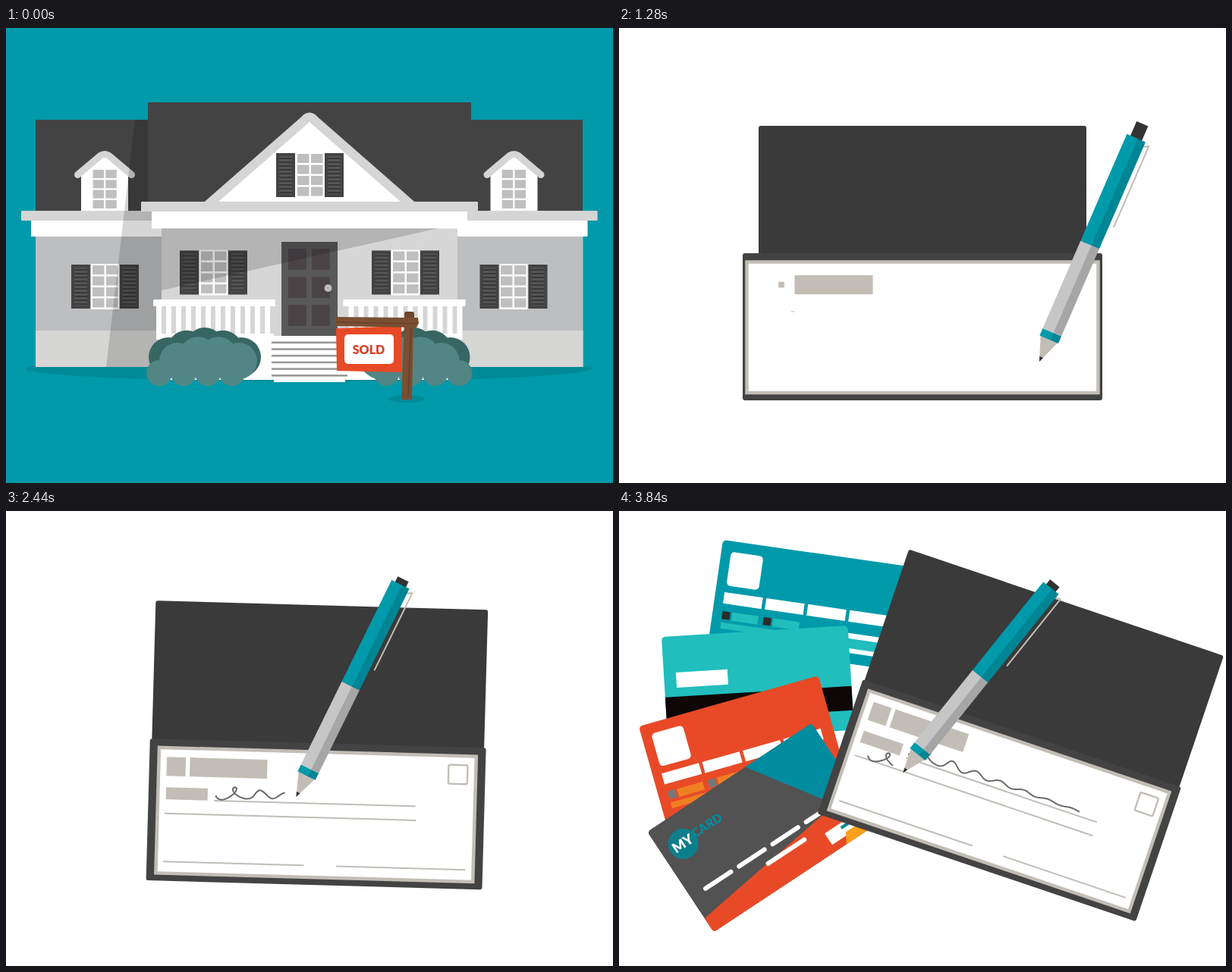
Write an HTML page that moves like this. It is 800 px wide and 600 px high and loops after 3.88 s.

```html
<!DOCTYPE html>
<html lang="en">
<head>
<meta charset="utf-8">
<title>Sold house to signed check</title>
<style>
html, body { margin: 0; width: 100%; height: 100%; overflow: hidden; background: #fff; }
svg { display: block; width: 100vw; height: 100vh; }
text { font-family: Lato, "Open Sans", sans-serif; font-weight: 900; }
</style>
</head>
<body>
<svg id="stage" viewBox="0 0 800 600"></svg>
<script>
const LOOP = 3880;
const TEAL = '#009aaa', DEEP = '#008594', MINT = '#22bdbd', ORANGE = '#e84a27';
const DARK = '#3a3a3a', ROOF = '#434343', EAVE = '#d5d5d5', BEIGE = '#c2beb6';

// Markup helpers
const rect = (x, y, w, h, fill, more = '') =>
  `<rect x="${x}" y="${y}" width="${w}" height="${h}" fill="${fill}" ${more}/>`;
const poly = (points, fill, more = '') => `<polygon points="${points}" fill="${fill}" ${more}/>`;
const disc = (x, y, r, fill) => `<circle cx="${x}" cy="${y}" r="${r}" fill="${fill}"/>`;
const oval = (x, y, rx, ry, fill) => `<ellipse cx="${x}" cy="${y}" rx="${rx}" ry="${ry}" fill="${fill}"/>`;
const line = (d, color, width, more = '') =>
  `<path d="${d}" fill="none" stroke="${color}" stroke-width="${width}" ${more}/>`;
const group = (id, body) => `<g id="${id}">${body}</g>`;
const repeat = (n, f) => Array.from({ length: n }, (_, i) => f(i)).join('');
const mirror = body => body + `<g transform="matrix(-1 0 0 1 799.5 0)">${body}</g>`;

// House
const panes = (x, y, w, h, gap) => repeat(8, i =>
  rect(x + (i % 2) * (w + gap), y + (i >> 1) * (h + gap), w, h, '#bfbfbf'));

const shutter = (x, y) => rect(x, y, 25, 58, ROOF) + rect(x + 4, y + 4, 17, 50, '#555') +
  repeat(10, i => rect(x + 4, y + 6 + i * 5, 17, 2, '#383838'));

const casement = (x, y) => shutter(x, y) + shutter(x + 64, y) +
  rect(x + 26, y - 1, 37, 60, '#fff') + panes(x + 28, y + 1, 15.5, 12, 2.5);

const dormer = poly('99,241 99,188 130,166 161,188 161,241', '#fff') +
  line('M94.5 193.5 L124 168.5 Q130 164.5 136 168.5 L165.5 193.5', EAVE, 9, 'stroke-linecap="round"') +
  panes(114.5, 187, 14.5, 11, 2.3);

const wing = rect(39, 253, 166, 194, '#bdbec0') + rect(39, 399, 166, 48, '#d6d6d5') +
  dormer + rect(20, 241, 186, 13, EAVE, 'rx="1"') + rect(33, 254, 173, 21, '#fff', 'rx="1"') + casement(86, 312);

const rail = rect(194, 358, 161, 9, '#fff', 'rx="1"') + rect(198, 403, 155, 8, '#fff') +
  repeat(12, i => rect(198 + i * 13, 366, 7, 39, '#fff'));

const arch = (i, n) => Math.sin(Math.PI * i / (n - 1));
const bush = repeat(5, i => disc(214 + i * 24, 434 - 13 * arch(i, 5), 26, '#386663')) +
  repeat(4, i => disc(226 + i * 27, 439 - 9 * arch(i, 4), 24, '#528684') + disc(202 + i * 32, 455, 17, '#528684'));

const door = rect(363, 282, 74, 124, '#585858') +
  repeat(6, i => rect(372 + (i % 2) * 31, 291 + (i >> 1) * 37, 24, 28, '#4a4447')) + disc(424.5, 343, 5, '#b9b9b9');

const sign = oval(528, 489, 24, 5, '#008a97') +
  poly('525,392 537,392 535,490 521,490', '#7a4f32') + line('M534 392 L530 486', '#69432b', 2) +
  poly('435,396 521,393 522,454 436,452', ORANGE) + rect(446, 404, 65, 39, '#fff', 'rx="5"') +
  rect(525, 374, 13, 20, '#6e462c', 'rx="3"') +
  poly('434,381 543,382 544,389 541,395 434,393', '#7a4f32') + line('M436 388 L541 390', '#69432b', 1.5) +
  `<text x="478" y="430" font-size="16" text-anchor="middle" fill="#d9432a">SOLD</text>`;

const house = oval(399, 449, 373, 17, '#008a97') +
  rect(39, 121, 721, 122, ROOF, 'rx="1"') + mirror(wing) +
  poly('170,121 187,121 187,229 205,264 205,447 132,447', '#000', 'opacity=".16"') +
  rect(187, 98, 426, 135, ROOF, 'rx="1"') +
  rect(205, 260, 390, 151, '#d6d6d6') + rect(205, 411, 390, 53, '#fff') +
  poly('400,117 271,230 529,230', '#fff') +
  line('M264 235 L393 122 Q400 113 407 122 L536 235', EAVE, 12) + casement(356, 165) +
  rect(178, 229, 444, 13, EAVE, 'rx="1"') + rect(192, 242, 416, 22.5, '#fff') +
  casement(229, 293.5) + casement(482, 293.5) + door +
  poly('205,264 570,264 205,346', '#000', 'opacity=".16"') + mirror(rail) +
  rect(350, 406, 100, 58, '#fff') + rect(353, 460, 94, 7, '#fff') +
  repeat(6, i => rect(350, 413.5 + i * 8.7, 100, 2.6, '#999')) +
  poly('150,258 663,258 685,447 595,447 595,464 205,464 205,447 132,447', DARK, 'id="shade" opacity="0"') +
  mirror(bush) + sign;

// Bank cards
const card = (fill, dot, accent) => rect(0, 0, 246, 138, fill, 'rx="5"') +
  rect(13, 14, 43, 45, '#fff', 'rx="5"') + repeat(4, i => rect(12 + i * 55.6, 68, 51, 15, '#fff')) +
  repeat(2, i => rect(13 + i * 54.6, 93, 10.5, 10.5, dot) + rect(26 + i * 54.6, 93, 35, 11, accent)) +
  rect(13, 108, 74, 8, accent) + rect(160, 98, 73, 26, '#fff') + rect(167, 105, 59, 13, accent);

const stripe = rect(0, 0, 246, 138, MINT, 'rx="5"') + rect(16, 48, 68, 20, '#fff') + rect(0, 80, 246, 32, '#0d0707');

const dash = (x, y, length, from) =>
  `<line class="dash" x1="${x}" y1="${y}" y2="${y}" data-length="${length}" data-from="${from}"/>`;

const bank = `<clipPath id="edge"><rect width="260" height="159" rx="5"/></clipPath><g clip-path="url(#edge)">` +
  rect(0, 0, 260, 159, '#525252') + poly('0,137 260,102 260,159 0,159', ORANGE) +
  poly('155,0 260,0 260,156', '#008c9e') +
  group('stub', rect(194, 131, 48, 18, '#fff') + poly('210,159 218,145 245,145 245,159', '#f9a01b') + rect(216, 135, 16, 4, DEEP)) +
  '</g>' + disc(31, 39.5, 20, '#0d7f8c') +
  `<text x="16" y="45" font-size="18" fill="#fff">MY</text><text id="word" x="48" y="42" font-size="16" fill="#008c9e"></text>` +
  `<g stroke="#fff" stroke-width="6" stroke-linecap="round">` +
  repeat(4, i => dash(23 + i * 53, 105, 40, 3010 + i * 70)) + dash(110, 123, 57, 3290) + '</g>';

// Check book. The handwriting is a fading wave with one loop near its start.
const scrawl = 'M' + Array.from({ length: 160 }, (_, i) => {
  const u = i / 159, phase = 2 * Math.PI * (u - .097) / .143;
  const loop = 10 * Math.exp(-(((u - .097) / .08) ** 2));
  const x = 269 + 236 * u - loop * Math.sin(phase);
  const y = 376 + 5 * u - 10 * Math.exp(-2.5 * u) * Math.cos(phase);
  return x.toFixed(1) + ' ' + y.toFixed(1);
}).join('L');

const ink = (id, more = '') => line(scrawl, '#6b6b6b', 2, `id="${id}" pathLength="1" ${more}`);
// x, y, width, height, pop time
const labels = [[232, 331, 102, 25, 1010], [201.5, 331, 25, 25, 1258], [201.5, 371, 55, 16, 1276]];
// x, y, length
const rules = [[266, 387, 264], [201, 405.5, 330], [201, 469, 184], [429, 469, 169]];

const check = labels.map(([x, y, w, h], i) => group('label' + i, rect(-w / 2, -h / 2, w, h, BEIGE))).join('') +
  rules.map((r, i) => line('', '#c0bdb7', 2, `id="rule${i}" stroke-linecap="round"`)).join('') +
  group('stamp', rect(-12.5, -12.5, 25, 25, 'none', `rx="2" stroke="${BEIGE}" stroke-width="2.4"`)) +
  ink('ink1') + ink('ink2', 'transform="translate(-50 20)"');

const barrel = (from, to, lit, dim) => rect(-13, -to, 15.5, to - from, lit) + rect(2, -to, 11, to - from, dim);
const pen = rect(-8, -332, 16, 26, '#333', 'id="cap"') +
  line('M12 -305 L19 -308.5 L19 -196', BEIGE, 2, 'stroke-linecap="round" stroke-linejoin="round"') +
  poly('0,0 -12,-32 12,-32', BEIGE) + poly('0,0 -2.5,-6.5 2.5,-6.5', '#333') +
  barrel(31, 41, TEAL, DEEP) + barrel(41, 163, '#c6c6c6', '#a6a6a6') + barrel(163, 312, TEAL, DEEP);

document.getElementById('stage').innerHTML = rect(0, 0, 800, 600, TEAL) + group('house', house) +
  '<circle id="wipe" cx="214" cy="516" fill="#fff"/>' +
  group('card0', card(TEAL, '#2b2b2b', MINT)) + group('card1', stripe) +
  group('card2', card(ORANGE, '#777', '#f07f22')) + group('card3', bank) +
  group('book', rect(0, 0, 0, 0, DARK, 'id="cover" rx="3"') +
    group('tab', rect(364, 265, 72, 11, ROOF) + rect(395, 269.5, 10, 2, '#fff')) +
    rect(0, 0, 0, 0, ROOF, 'id="pad" rx="3"') +
    rect(0, 0, 0, 0, '#fff', `id="sheet" stroke="${BEIGE}" stroke-width="4.5"`) +
    group('check', check) + group('pen', pen));

// Motion helpers
const el = Object.fromEntries([...document.querySelectorAll('[id]')].map(e => [e.id, e]));
const set = (e, attrs) => { for (const k in attrs) e.setAttribute(k, attrs[k]); };
const show = (e, on) => e.setAttribute('visibility', on ? 'inherit' : 'hidden');
const span = (t, a, b) => Math.min(1, Math.max(0, (t - a) / (b - a)));
const smooth = u => u * u * (3 - 2 * u);
const inOut = u => u < .5 ? 4 * u ** 3 : 1 - 4 * (1 - u) ** 3;
const backOut = u => u && 1 + 2.4 * (u - 1) ** 3 + 1.4 * (u - 1) ** 2;
const mix = (a, b, u) => a + (b - a) * u;
const box = (e, half, top, bottom) =>
  set(e, { x: 400 - half, y: top, width: 2 * half, height: Math.max(0, bottom - top) });

function drawHouse(t) {
  const s = mix(1, .711, smooth(span(t, 240, 840)));
  set(el.house, { transform: `translate(400 300) scale(${s}) translate(-400 -300)` });
  set(el.shade, { opacity: .4 * span(t, 700, 920) });
  set(el.wipe, { r: 800 * span(t, 890, 1120) ** 3 });
  show(el.house, t < 1120);
}

// Fanned x, y and tilt, then the later drift in y and tilt
const deck = [[110, 30, 8.4, 8, -.2], [43, 166, -3.7, 0, .2], [27, 284, -15.8, 0, 0], [52, 421, -36, 2, 2.5]];

function drawCards(t) {
  const drift = smooth(span(t, 3160, 3720));
  deck.forEach(([x, y, tilt, dy, turn], i) => {
    const start = i === 2 ? 2693 : 2733;
    const p = backOut(span(t, start, start + 307));
    const left = mix(360, x, p) + (27 - 14 * i) * drift;
    const top = mix(110 + .3 * y, y, p) + dy * drift;
    show(el['card' + i], p > .15);
    set(el['card' + i], { transform: `translate(${left} ${top}) rotate(${tilt + turn * drift})` });
  });
  el.word.textContent = 'CARD'.slice(0, Math.max(0, Math.floor((t - 3000) / 40)));
  document.querySelectorAll('.dash').forEach(d => {
    const { from, length } = d.dataset, u = span(t, +from, +from + 200);
    show(d, u > 0);
    set(d, { x2: +d.getAttribute('x1') + length * u });
  });
  show(el.stub, t > 3360);
}

function drawBook(t) {
  const turn = inOut(span(t, 2240, 2964));
  set(el.book, { transform: `translate(${400 + 130.4 * turn} ${310 - 14.5 * turn}) rotate(${18.7 * turn}) translate(-400 -310)` });
  show(el.book, t >= 740);

  const grow = smooth(span(t, 740, 920)), lift = smooth(span(t, 920, 1200));
  const unfold = backOut(span(t, 920, 1240)), settle = smooth(span(t, 1280, 1700));
  box(el.cover, 157 + 59 * grow + 3 * settle, 250 - 92 * grow - 29 * lift - 3.5 * settle, 250 + 22 * grow + 38 * lift);
  const half = 187 + 50 * unfold - 15.5 * settle;
  const top = 272 + 25 * unfold + 10.5 * settle, bottom = 294 + 197 * unfold + 3.5 * settle;
  box(el.pad, half, top, bottom);
  box(el.sheet, half - 5.5 - 7 * settle, top + 11.5, bottom - 10);
  show(el.pad, t >= 900);
  show(el.sheet, t >= 1000);
  show(el.tab, t > 860 && t < 960);

  set(el.check, { transform: `translate(0 ${5 * settle - 5})` });
  labels.forEach(([x, y, w, h, from], i) => set(el['label' + i], {
    transform: `translate(${x + w / 2} ${y + h / 2}) scale(${backOut(span(t, from, from + 300))})` }));
  rules.forEach(([x, y, length], i) => {
    const u = backOut(span(t, 1480 + i * 130, 1780 + i * 130));
    set(el['rule' + i], { d: u ? `M${x} ${y} h${length * u}` : '' });
  });
  set(el.stamp, { transform: `translate(585.5 343.5) scale(${backOut(span(t, 1900, 2200))})` });
}

// The pen's pose is the sum of its moves
function drawPen(t) {
  const enter = smooth(span(t, 900, 1260)), cross = smooth(span(t, 1400, 1970));
  const write = span(t, 1990, 2980), back = 1 - (1 - span(t, 2980, 3390)) ** 2;
  const again = span(t, 3600, 3840);
  const x = 270 + 284 * enter - 292 * cross + 244 * write - 288 * back + 50 * again;
  const y = 297 + 143 * enter - 62 * cross + 2 * write + 20 * back + 7 * again;
  const tilt = -70 + 93.4 * enter - 3.4 * cross + 10 * (write - back) + 11 * Math.sin(Math.PI * back);
  const size = .03 + enter - .03 * cross;
  set(el.pen, { transform: `translate(${x} ${y}) rotate(${tilt}) scale(${size})` });
  set(el.cap, { y: 12 * cross - 332 });
  show(el.pen, t >= 900);

  const trace = (e, u) => { show(e, u > 0); set(e, { 'stroke-dasharray': `${u} 2` }); };
  trace(el.ink1, write);
  trace(el.ink2, .22 * again);
}

const start = performance.now();
function tick() {
  const t = (performance.now() - start) % LOOP;
  drawHouse(t);
  drawCards(t);
  drawBook(t);
  drawPen(t);
  requestAnimationFrame(tick);
}
tick();
</script>
</body>
</html>
```
